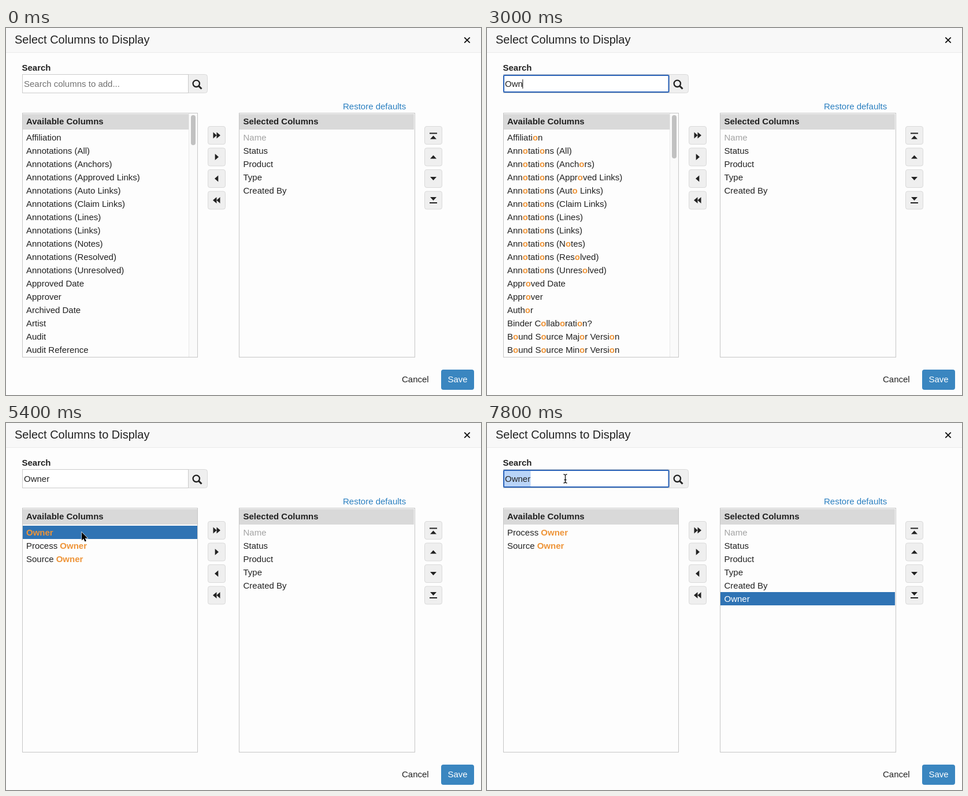
Write an HTML page that moves like this. It is 822 px wide and 636 px high and loops after 8 s.

```html
<!DOCTYPE html>
<html lang="en">
<head>
<meta charset="utf-8">
<title>Select Columns to Display</title>
<style>
  html, body { margin: 0; width: 100%; height: 100%; overflow: hidden; background: #fdfdfd; }
  svg { display: block; width: 100vw; height: 100vh; }
  text { font: 15px "Liberation Sans", Arial, sans-serif; fill: #212121; white-space: pre; }
  .bold, .hit { font-weight: bold; }
  .hit { fill: #ee9438; }
  .title { font-size: 20px; }
  .link { fill: #2a7fc0; }
  .muted { fill: #a3a3a3; }
  .hint { fill: #717171; }
  .light { fill: #fff; }
  .box { fill: #fdfdfd; stroke: #c6c6c6; }
  .head { fill: #d9d9d9; }
  .button { fill: #efefef; stroke: #dadada; }
  .picked { fill: #2f73b4; }
  .icon { fill: #222; }
</style>
</head>
<body>
<svg id="stage" viewBox="0 0 822 636"></svg>
<script>
const LOOP = 8000, STEP = 200, ROW = 23;
const stage = document.getElementById("stage");

function add(parent, tag, attrs = {}, content) {
  const node = document.createElementNS("http://www.w3.org/2000/svg", tag);
  for (const key in attrs) node.setAttribute(key, attrs[key]);
  if (content !== undefined) node.textContent = content;
  parent.appendChild(node);
  return node;
}
const rect = (parent, x, y, width, height, attrs) =>
  add(parent, "rect", { x, y, width, height, ...attrs });
const label = (parent, x, y, content, cls = "") =>
  add(parent, "text", { x, y, class: cls }, content);
const path = (parent, d, attrs) => add(parent, "path", { d, ...attrs });
const show = (node, on) => node.setAttribute("visibility", on ? "visible" : "hidden");

const notes = ["All", "Anchors", "Approved Links", "Auto Links", "Claim Links", "Lines",
  "Links", "Notes", "Resolved", "Unresolved"].map(kind => `Annotations (${kind})`);
const start = ["Affiliation", ...notes, "Approved Date", "Approver"];
const allColumns = [...start, "Archived Date", "Artist", "Audit", "Audit Reference"];
const looseMatches = [...start, "Author", "Binder Collaboration?",
  "Bound Source Major Version", "Bound Source Minor Version"];
const owners = ["Owner", "Process Owner", "Source Owner"];
const chosen = ["Name", "Status", "Product", "Type", "Created By"];

// Dialog frame
rect(stage, 0, 0, 822, 636, { fill: "#fdfdfd" });
rect(stage, 0, 0, 822, 42, { fill: "#f8f8f8" });
rect(stage, 0, 42, 822, 1, { fill: "#ebebeb" });
label(stage, 15, 27, "Select Columns to Display", "title");
path(stage, "M793.3 16.3l9.4 9.4m0-9.4l-9.4 9.4", { stroke: "#111", "stroke-width": 1.9 });
label(stage, 27.5, 74, "Search", "bold");
label(stage, 583, 141, "Restore defaults", "link");
label(stage, 685, 614, "Cancel");
rect(stage, 753, 592, 57, 35, { rx: 4, fill: "#3a86c0" });
label(stage, 764.5, 614, "Save", "light");

// Search field
path(stage, "M315.5 80.5h29a4 4 0 0 1 4 4v24a4 4 0 0 1-4 4h-29z", { class: "button" });
add(stage, "circle", { cx: 329.3, cy: 96.3, r: 5.7, fill: "none", stroke: "#222", "stroke-width": 2.3 });
path(stage, "M333.5 100.5l5 5", { stroke: "#222", "stroke-width": 3 });
rect(stage, 28.5, 80.5, 287, 32, { fill: "#fff", stroke: "#cbcbcb" });
const ring = rect(stage, 29, 82, 285.5, 29, { rx: 1.5, fill: "#fff", stroke: "#2962b8", "stroke-width": 2 });
const selection = rect(stage, 30, 83, 45.5, 27, { fill: "#b9d4f8" });
const hint = label(stage, 31, 102, "Search columns to add...", "hint");
const typed = label(stage, 31, 102, "");
const caret = rect(stage, 31, 89, 1, 16, { fill: "#111" });

// Lists
rect(stage, 28.5, 147.5, 303, 423, { class: "box" });
rect(stage, 403.5, 147.5, 304, 423, { class: "box" });
rect(stage, 29, 149, 302, 27, { class: "head" });
rect(stage, 404, 149, 302, 27, { class: "head" });
label(stage, 35, 167, "Available Columns", "bold");
label(stage, 410.5, 167, "Selected Columns", "bold");
const scroller = add(stage, "g");
rect(scroller, 316, 148, 15, 422, { fill: "#fafafa" });
rect(scroller, 316, 148, 1, 422, { fill: "#e9e9e9" });
const thumb = rect(scroller, 320, 151, 8, 52, { rx: 4, fill: "#c1c1c1" });
const available = add(stage, "g");
chosen.forEach((name, i) => label(stage, 410.5, 195 + i * ROW, name, i ? "" : "muted"));
const added = add(stage, "g");
rect(added, 404, 293, 302, ROW, { class: "picked" });
label(added, 410.5, 310, "Owner", "light");

// Buttons; each icon is drawn around its button's centre
const right = "M-2.8-5.5L3.5 0L-2.8 5.5z", left = "M2.8-5.5L-3.5 0L2.8 5.5z";
const up = "M-5.5 3L0-3L5.5 3z", down = "M-5.5-3L0 3L5.5-3z";
const icons = [
  [364.5, ["M-6-5.5L0 0V-5.5L6.5 0L0 5.5V0L-6 5.5z", right, left, "M6-5.5L0 0V-5.5L-6.5 0L0 5.5V0L6 5.5z"]],
  [739.5, ["M-6.5-4.5h13v2h-13zM-5.5 6.5L0 .5L5.5 6.5z", up, down, "M-6.5 3.5h13v2h-13zM-5.5-5.5L0 .5L5.5-5.5z"]]
];
for (const [x, shapes] of icons) shapes.forEach((d, i) => {
  const y = 185.5 + i * 37.5;
  rect(stage, x - 15, y - 15, 30, 31, { rx: 3.5, class: "button" });
  path(stage, d, { class: "icon", transform: `translate(${x} ${y + .5})` });
});

// Pointers
const pointers = {
  arrow: add(stage, "g"), beam: add(stage, "g"), move: add(stage, "g")
};
path(pointers.arrow, "M0 0V14.2L3.2 11.2L5.4 16.2L7.8 15.2L5.6 10.3H10z",
  { fill: "#000", stroke: "#fff", "stroke-width": 1.2, "paint-order": "stroke" });
const beam = "M-3-7.5Q0-7.5 0-5V5Q0 7.5-3 7.5M3-7.5Q0-7.5 0-5M0 5Q0 7.5 3 7.5M-2 2H2";
path(pointers.beam, beam, { fill: "none", stroke: "#fff", "stroke-width": 3 });
path(pointers.beam, beam, { fill: "none", stroke: "#111", "stroke-width": 1.3 });
path(pointers.move, "M0-7.5l3 3.3h-2v3.2h3.2v-2l3.3 3l-3.3 3v-2h-3.2v3.2h2l-3 3.3l-3-3.3h2v-3.2h-3.2v2l-3.3-3l3.3-3v2h3.2v-3.2h-2z",
  { fill: "#000", stroke: "#fff", "stroke-width": 1.6, "paint-order": "stroke" });

// Pointer trips: [time, x, y] stops
const trips = [
  [[200, 440, 16], [1200, 210, 97], [1600, 210, 97], [2000, 356, 22]],
  [[4000, 330, 24], [4800, 85, 184], [5200, 85, 184], [6000, 380, 218], [6200, 366, 222],
    [6400, 362, 221], [6600, 338, 212], [7200, 146, 112], [7400, 135.5, 96.5], [8000, 135.5, 96.5]]
];
function pointerAt(t) {
  for (const trip of trips) {
    for (let i = 1; i < trip.length; i++) {
      const [t0, x0, y0] = trip[i - 1], [t1, x1, y1] = trip[i];
      if (t < t0 || t > t1) continue;
      const p = (t - t0) / (t1 - t0), k = p * p * (3 - 2 * p);
      // the pointer rests in the field until it leaves for the header
      if (t0 === 1600 && t < 2000) return [x0, y0];
      return [x0 + (x1 - x0) * k, y0 + (y1 - y0) * k];
    }
  }
  return null;
}
const pointerKind = ([x, y]) =>
  y < 42 ? "move" : x > 28 && x < 315 && y > 80 && y < 113 ? "beam" : "arrow";

let listKey = "";
function drawList(names, query, picked) {
  const key = names.join() + query + picked;
  if (key === listKey) return;
  listKey = key;
  available.replaceChildren();
  if (picked) rect(available, 29, 178, 302, ROW, { class: "picked" });
  names.forEach((name, i) => {
    const line = label(available, 35, 195 + i * ROW, "");
    const parts = query ? name.split(new RegExp(`(${query})`, "i")) : [name];
    parts.forEach((part, n) => part && add(line, "tspan", n % 2 ? { class: "hit" } : {}, part));
  });
}

const within = (t, ...spans) => spans.some(([a, b]) => t >= a && t < b);

function draw(t) {
  const word = "Owner".slice(0, Math.max(0, Math.floor((t - 2400) / STEP)));
  typed.textContent = word;
  show(hint, !word);
  show(ring, within(t, [1400, 5200], [7400, LOOP]));
  show(selection, t >= 7600);
  show(caret, within(t, [1400, 1600], [2200, 3800], [4400, 5000], [7400, 7600]));
  caret.setAttribute("x", 31 + (word ? typed.getComputedTextLength() - .5 : 0));

  show(scroller, t < 3400);
  thumb.setAttribute("height", t < 2800 ? 52 : 75);
  if (t < 2800) drawList(allColumns, "", false);
  else if (t < 3400) drawList(looseMatches, "o", false);
  else drawList(t < 6400 ? owners : owners.slice(1), t < 3800 ? "Own" : "Owner", within(t, [5200, 6400]));
  show(added, t >= 6400);

  const spot = pointerAt(t), kind = spot && pointerKind(spot);
  for (const name in pointers) {
    show(pointers[name], name === kind);
    if (name === kind) pointers[name].setAttribute("transform", `translate(${spot})`);
  }
}

function tick(now) {
  draw(Math.floor((now % LOOP) / STEP) * STEP);
  requestAnimationFrame(tick);
}
draw(0);
requestAnimationFrame(tick);
</script>
</body>
</html>
```
